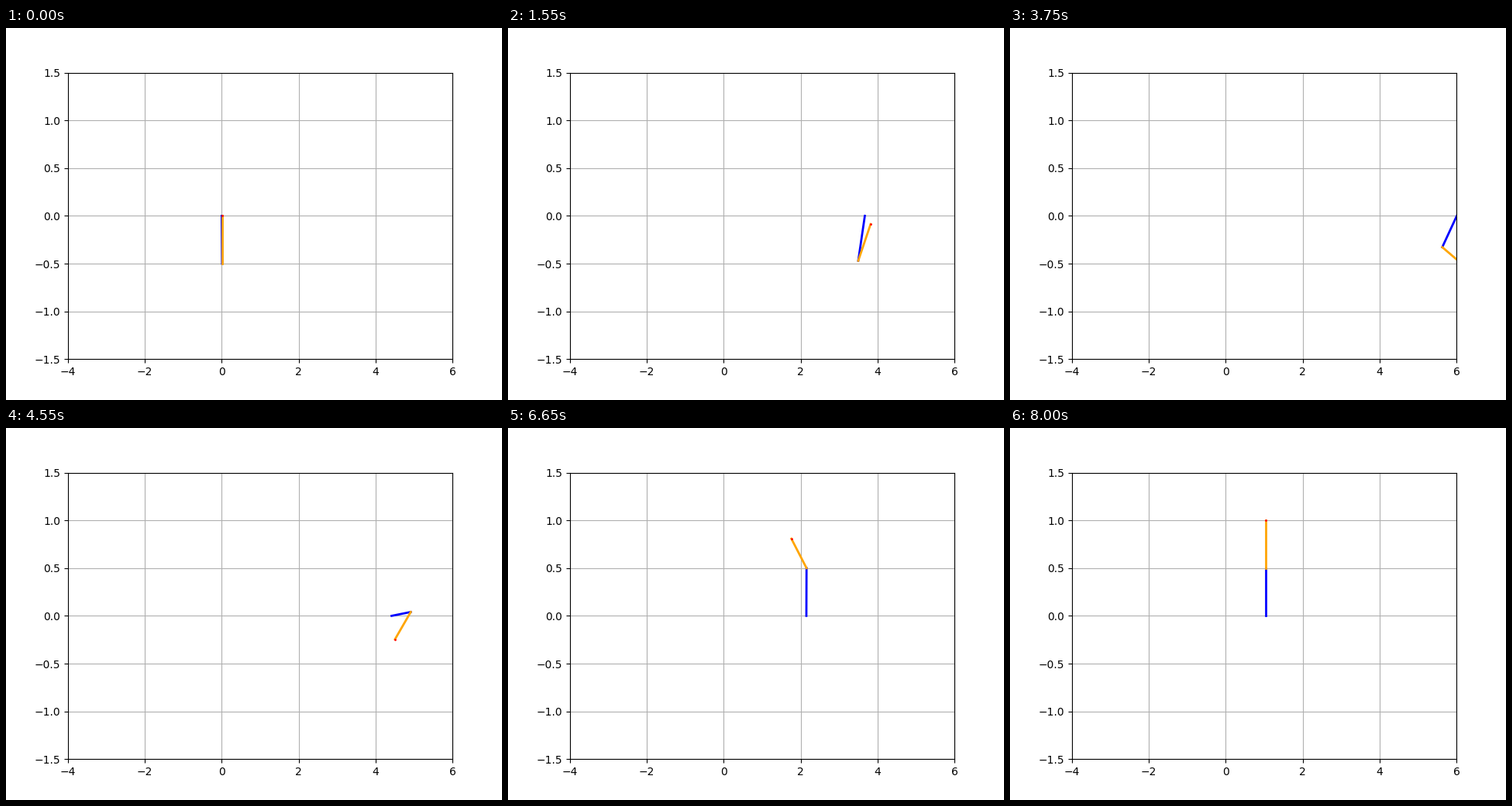
Recreate the animation shown at these times as a matplotlib script. Size 640 by 480 pixels, loop 8050 ms.

```python
import numpy as np
import matplotlib.pyplot as plt
from matplotlib.animation import FuncAnimation

FRAMES, INTERVAL = 161, 50
LENGTH = 0.5

# time (s), cart position, angle of each pole from upright (degrees, clockwise)
POSES = np.array([
    (0.00, 0.000, 179, 0),
    (0.90, 1.460, 251, -17),
    (1.55, 3.670, 200, 40),
    (2.30, 5.556, 27, 250),
    (2.70, 6.290, 1, 310),
    (3.20, 6.650, -24, 302),
    (3.75, 6.010, -131, 469),
    (4.35, 4.650, -278, 594),
    (5.00, 3.875, -220, 554),
    (5.30, 3.077, -222.3, 525),
    (5.55, 2.560, -250, 517),
    (6.05, 2.210, -320, 577),
    (6.65, 2.149, -359.5, 668),
    (7.30, 1.767, -369, 708),
    (8.00, 1.045, -360, 720),
])


def smooth_path(times, values):
    """Cubic spline through the poses, starting at rest."""
    n, h = len(times), np.diff(times)
    rate = np.diff(values, axis=0) / h[:, None]
    a, b = np.zeros((n, n)), np.zeros_like(values)
    a[0, 0] = 1
    for i in range(1, n - 1):
        p, q = 1 / h[i - 1], 1 / h[i]
        a[i, i - 1:i + 2] = p, 2 * (p + q), q
        b[i] = 3 * (p * rate[i - 1] + q * rate[i])
    a[-1, -2:] = 1, 2
    b[-1] = 3 * rate[-1]
    slopes = np.linalg.solve(a, b)

    def at(t):
        i = min(np.searchsorted(times, t, side="right") - 1, n - 2)
        s = (t - times[i]) / h[i]
        ease = s * s * (3 - 2 * s)
        return ((1 - ease) * values[i] + ease * values[i + 1]
                + s * (1 - s) * h[i]
                * ((1 - s) * slopes[i] - s * slopes[i + 1]))

    return at


def pole_end(x, y, angle):
    a = np.radians(angle)
    return x + LENGTH * np.sin(a), y + LENGTH * np.cos(a)


state_at = smooth_path(POSES[:, 0], POSES[:, 1:])

fig, ax = plt.subplots(figsize=(6.4, 4.8), dpi=100)
ax.set_xlim(-4, 6)
ax.set_ylim(-1.5, 1.5)
ax.grid()

lower, = ax.plot([], [], color="blue", lw=2)
upper, = ax.plot([], [], color="orange", lw=2)
tip, = ax.plot([], [], "o", color="red", ms=2, mew=0)


def update(frame):
    x, a1, a2 = state_at(frame * INTERVAL / 1000)
    jx, jy = pole_end(x, 0, a1)
    tx, ty = pole_end(jx, jy, a2)
    lower.set_data([x, jx], [0, jy])
    upper.set_data([jx, tx], [jy, ty])
    tip.set_data([tx], [ty])
    return lower, upper, tip


anim = FuncAnimation(fig, update, frames=FRAMES, interval=INTERVAL,
                     repeat=True, repeat_delay=0)
plt.show()
```
